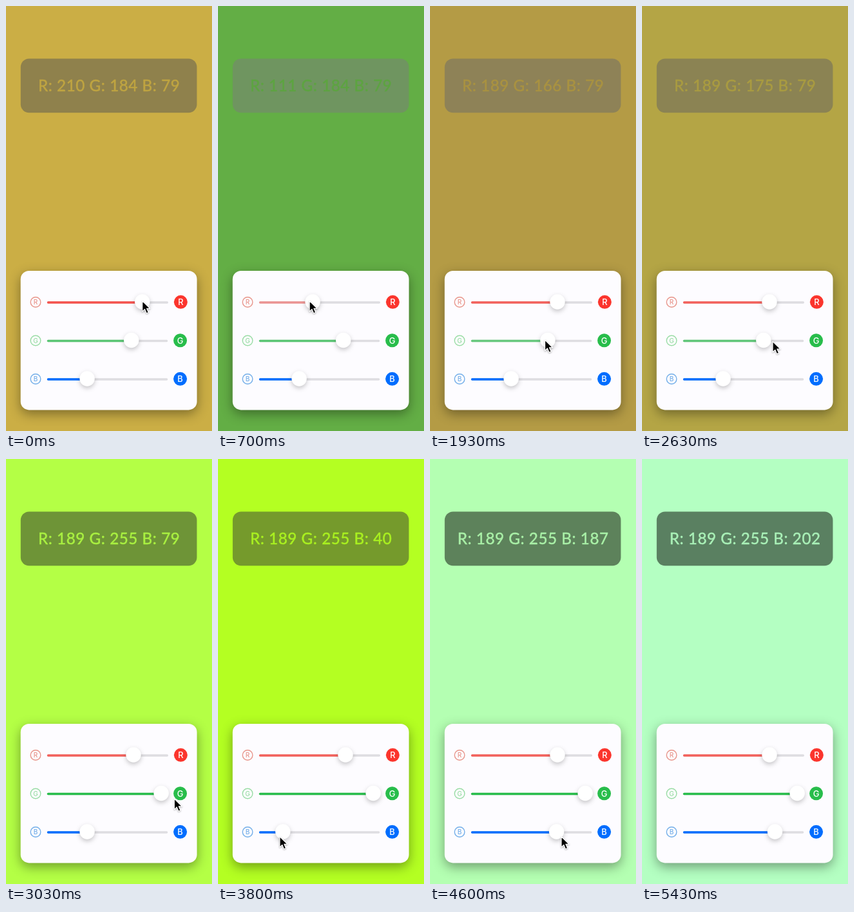
These frames come from a looping animation (320 by 658 pixels, 5.53 s). An HTML page:

```html
<!DOCTYPE html>
<html lang="en">
<head>
<meta charset="utf-8">
<title>Colour sliders</title>
<style>
  html, body { margin: 0; width: 100%; height: 100%; overflow: hidden; }
  svg { display: block; width: 320px; height: 658px; }
  #label { font: 400 24.2px Lato, "Open Sans", sans-serif; letter-spacing: .55px; stroke-width: .5; }
  .icon { font-family: Inter, Roboto, sans-serif; font-weight: 500; text-anchor: middle; }
  .card { filter: drop-shadow(0 6px 9px rgba(0, 0, 0, .38)); }
  .thumb { fill: #fff; filter: drop-shadow(0 3px 3.5px rgba(0, 0, 0, .22)); }
  #cursor { filter: drop-shadow(0 1.5px 1px rgba(0, 0, 0, .3)); }
</style>
</head>
<body>
<svg viewBox="0 0 320 658">
  <rect id="bg" width="320" height="658"/>
  <rect id="panel" x="22.8" y="81.5" width="273.7" height="83.7" rx="13"/>
  <text id="label" x="160.2" y="132" text-anchor="middle"></text>
  <rect class="card" x="22.7" y="410" width="273.9" height="215.4" rx="13" fill="#fdfcff"/>
  <g id="sliders"></g>
  <path id="cursor" d="M0 0V16.6L3.8 13L6.5 19.3L9.6 18L6.9 11.8H12Z"
        fill="#000" stroke="#fff" stroke-width="1.2" stroke-linejoin="round"/>
</svg>
<script>
const LOOP = 5530, FPS = 30, LAST = 163;
const TRAVEL = 300, CURSOR_OFF = 5300;
const TRACK_X = 74.4, TRACK_SCALE = .654;

// Each slider is dragged once: down from -> low, then up low -> to.
// lead: ms the cursor runs ahead of the thumb; grip, drop: cursor height and its sag.
const sliders = [
  { name: 'R', y: 458.5, end: 251.8, color: '#fb352d', soft: '#e8958b', fade: true,
    start: 560, turn: 830, stop: 1440, from: 210, low: 23, to: 189, lead: 7, grip: -2, drop: 1 },
  { name: 'G', y: 518, end: 251, color: '#28bd4b', soft: '#98dca4', fade: true,
    start: 1780, turn: 2400, stop: 2859, from: 184, low: 58, to: 286, lead: 28, grip: -1, drop: 9 },
  { name: 'B', y: 577.5, end: 251, color: '#006dfe', soft: '#73aee9', fade: false,
    start: 3430, turn: 4180, stop: 4690, from: 79, low: 0, to: 202, lead: 45, grip: 7, drop: 0 }
];

const $ = id => document.getElementById(id);
const clamp = (v, lo, hi) => Math.min(hi, Math.max(lo, v));
const mix = (a, b, k) => a + (b - a) * k;
const ease = (t, t0, t1) => (1 - Math.cos(Math.PI * clamp((t - t0) / (t1 - t0), 0, 1))) / 2;
const rgb = c => `rgb(${c.map(Math.round).join(',')})`;
const thumbX = v => TRACK_X + TRACK_SCALE * v;

// May pass 255: the cursor then overshoots the stopped thumb
const dragged = (s, t) => t < s.turn
  ? mix(s.from, s.low, ease(t, s.start, s.turn))
  : mix(s.low, s.to, ease(t, s.turn, s.stop));

function grabPoint(s, t) {
  const sag = s.drop * ease(t, s.turn, s.stop) ** 2;
  return [thumbX(dragged(s, t + s.lead)), s.y + s.grip + sag];
}

// Follow one slider, then travel to the next just before its drag starts
function cursorAt(t) {
  return sliders.slice(1).reduce((p, s) => {
    const k = ease(t, s.start - TRAVEL, s.start);
    return grabPoint(s, t).map((v, i) => mix(p[i], v, k));
  }, grabPoint(sliders[0], t));
}

function add(parent, tag, attrs, text = '') {
  const el = document.createElementNS('http://www.w3.org/2000/svg', tag);
  for (const k in attrs) el.setAttribute(k, attrs[k]);
  el.textContent = text;
  return parent.appendChild(el);
}

function build(s) {
  const g = add($('sliders'), 'g', {});
  const line = { y1: s.y + .6, y2: s.y + .6, x1: 65.5, 'stroke-width': 3.5, 'stroke-linecap': 'round' };
  const iconX = s.end + 19.6;
  add(g, 'line', { ...line, x2: s.end - 1.5, stroke: '#dedde1' });
  s.fill = add(g, 'line', { ...line, stroke: s.color });
  s.thumb = add(g, 'circle', { class: 'thumb', cy: s.y - .5, r: 11.7 });
  add(g, 'circle', { cx: 46, cy: s.y, r: 7.8, fill: 'none', stroke: s.soft, 'stroke-width': 1.4 });
  add(g, 'text', { class: 'icon', x: 46, y: s.y + 3.7, 'font-size': 10, fill: s.soft }, s.name);
  add(g, 'circle', { cx: iconX, cy: s.y - .2, r: 10.5, fill: s.color });
  add(g, 'text', { class: 'icon', x: iconX, y: s.y + 4.5, 'font-size': 13, fill: '#fff' }, s.name);
}

function draw(t) {
  const values = sliders.map(s => {
    const v = clamp(dragged(s, t), 0, 255);
    s.thumb.setAttribute('cx', thumbX(v));
    s.fill.setAttribute('x2', thumbX(v));
    s.fill.setAttribute('stroke-opacity', s.fade ? v / 255 : 1);
    return Math.round(v);
  });

  // Screen tone curve, then a half-strength panel that lightens on dark colours
  const tone = values.map(v => v - 12.5 * Math.sin(Math.PI * v / 255));
  const [r, g, b] = values;
  const lift = Math.max(0, 163 - .2 * r - .36 * g - .165 * b);
  const ink = rgb(tone.map(c => c * .94));
  $('bg').setAttribute('fill', rgb(tone));
  $('panel').setAttribute('fill', rgb(tone.map(c => c * .5 + lift)));
  $('label').setAttribute('fill', ink);
  $('label').setAttribute('stroke', ink);
  $('label').textContent = `R: ${r} G: ${g} B: ${b}`;

  $('cursor').setAttribute('transform', `translate(${cursorAt(t)})`);
  $('cursor').setAttribute('visibility', t < CURSOR_OFF ? 'visible' : 'hidden');
}

function tick() {
  const t = performance.now() % LOOP;
  const step = Math.min(LAST, Math.floor((t + 5) * FPS / 1000));
  draw(step * 1000 / FPS);
  requestAnimationFrame(tick);
}

sliders.forEach(build);
tick();
</script>
</body>
</html>
```
